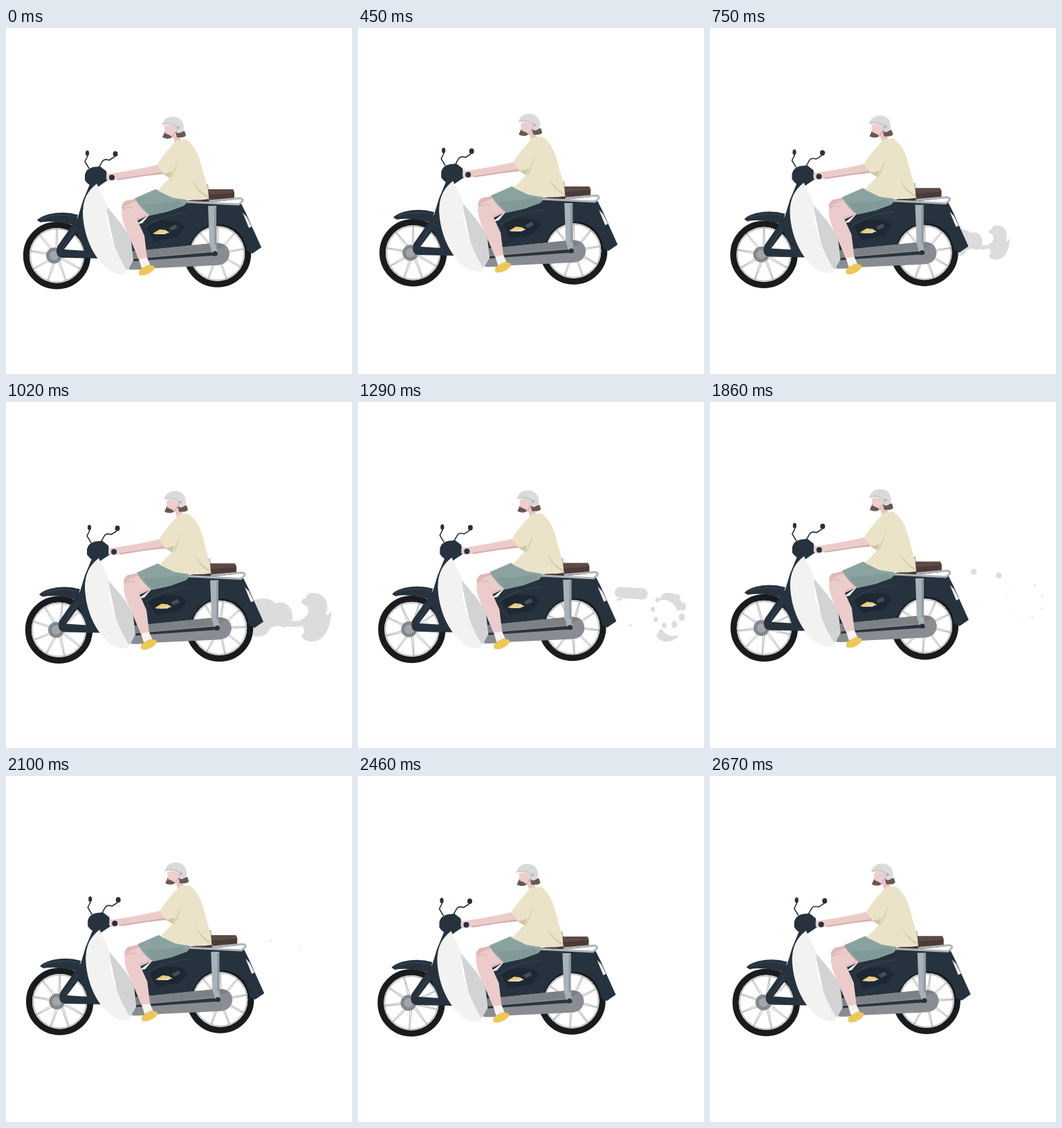
An HTML page for the animation above (2700 ms loop, 500 by 500 pixels).

```html
<!DOCTYPE html>
<html lang="en">
<head>
<meta charset="utf-8">
<title>Scooter ride</title>
<style>
html, body { margin: 0; width: 100%; height: 100%; overflow: hidden; background: #fff; }
svg { display: block; width: 100vw; height: 100vh; }
</style>
</head>
<body>
<svg viewBox="0 0 500 500">
  <defs>
    <filter id="rough" filterUnits="userSpaceOnUse" x="0" y="100" width="420" height="300" color-interpolation-filters="sRGB">
      <feTurbulence type="fractalNoise" baseFrequency="0.3" numOctaves="2" seed="4" result="n"/>
      <feDisplacementMap in="SourceGraphic" in2="n" scale="1.4" xChannelSelector="R" yChannelSelector="G"/>
    </filter>
  </defs>

  <g id="smoke" fill="#dcdcdc">
    <path id="cloud" d="M352 289C366 282 383 282 389 291C400 287 412 294 413 304C416 314 412 325 401 326C394 322 386 324 381 328C378 337 368 341 356 338Z
      M405 319C414 314 420 319 428 314C437 308 440 302 434 294C424 291 425 285 434 283C433 278 440 275 445 276C460 276 469 291 462 307C467 310 468 303 470 302C470 326 459 346 444 346C436 347 429 343 427 337C434 333 430 327 428 323C420 326 411 326 405 323Z"/>
    <g id="gaps" fill="#fff"></g>
    <g id="bits"></g>
  </g>

  <g id="ride" filter="url(#rough)">
    <g id="front"></g>
    <g id="rear"></g>

    <!-- mudguard, fork, rear body, handlebar, mirrors -->
    <g fill="#26323e">
      <path d="M45 278Q48 273 62 269Q84 264 104 270L99 286Q88 281 72 280Q57 279 50 281Z"/>
      <path fill-rule="evenodd" d="M121 226L111 250L104 273L74 316Q70 331 82 332L134 333L150 345L146 300L131 226ZM102 296L84 320L114 322Z"/>
      <path d="M178 275L208 268L250 252L340 254L347 268L355 286L369 317L356 326L348 322Q344 292 318 285Q286 280 271 303Q264 313 264 323L200 328L180 335Z"/>
      <path d="M114 212Q116 203 126 201L136 200L145 207L147 220L138 226L131 231Q120 229 114 220Z"/>
      <ellipse cx="117.500" cy="181" rx="2.600" ry="4"/>
      <ellipse cx="158" cy="182" rx="3.500" ry="4"/>
    </g>
    <path d="M118 185L114 193L120 203M157 186L149 191Q141 188 138 195L134 202" fill="none" stroke="#26323e" stroke-width="1.600"/>
    <path d="M50 276Q74 267 100 273M100 290L82 318M200 288Q225 270 262 267" fill="none" stroke="#374451" stroke-width="1.200"/>

    <!-- side panel and tail light -->
    <path d="M203 288Q222 273 252 281L258 288L247 302L214 308Z" fill="#1e2833"/>
    <path d="M235 289L245 284L248 289L239 293Z" fill="#424e59"/>
    <path d="M212 297L222 291L231 292L236 296L222 298Z" fill="#ebd06c"/>
    <path d="M212 298L236 294L230 298Z" fill="#e8d7df"/>
    <path d="M342 267L348 273L355 287L351 289Z" fill="#eeeeee"/>

    <!-- engine and swing arm -->
    <path d="M180 323L298 311Q322 308 323 327Q321 343 302 343L216 347Q192 350 178 349Q172 336 180 323Z" fill="#898d91"/>
    <path d="M180 323L298 311Q310 310 316 315L298 322L184 333Z" fill="#7c8186"/>
    <path d="M183 334L298 324Q306 323 306 327Q305 330 298 329L184 337Z" fill="#2b353f"/>

    <!-- leg shield -->
    <path d="M144 256C160 275 178 294 181 309L184 336L176 350L164 350Z" fill="#d2d3d4"/>
    <path d="M131 225C118 235 111 248 111 268C112 295 122 324 141 343C152 354 162 357 173 355L175 351C163 332 149 300 146 277C147 262 146 254 140 243Z" fill="#f2f2f0"/>

    <!-- saddle and rack -->
    <path d="M258 250L292 245L294 251L262 254Z" fill="#44393a"/>
    <path d="M288 227L292 225L294 246L290 247Z" fill="#bdb7a4"/>
    <path d="M291 233L328 233L330 237L330 248L294 252Z" fill="#4b3b38"/>
    <path d="M291 233L328 233L329 238L293 241Z" fill="#5d4944"/>
    <path d="M258 251L336 255Q347 248 338 246L294 250" fill="none" stroke="#b0b4b7" stroke-width="3"/>
    <path d="M292 257L304 257L304 313L305 324L298 325L294 312Z" fill="#a8b2b8"/>
    <path d="M301 259L304 259L304 313L301 314Z" fill="#8e999f"/>
    <circle cx="302" cy="326" r="3.500" fill="#26323e"/>

    <!-- legs -->
    <path d="M190 246L172 250Q165 256 168 263L190 268Z" fill="#dfb9b6"/>
    <path d="M188 284L209 268L197 282Z" fill="#f3f2ef"/>
    <path d="M190 250Q174 254 167 263Q166 277 176 297L192 335L204 333L200 300L190 278L210 269Z" fill="#ecccca"/>
    <path d="M184 261Q178 256 169 262M188 276Q198 274 206 267" fill="none" stroke="#d9aaa8" stroke-width="1"/>
    <path d="M192 334L204 332L209 344L196 347Z" fill="#f4f3ef"/>
    <path d="M192 351Q196 346 206 342L214 344Q217 348 208 354Q197 360 192 356Z" fill="#edc856"/>
    <path d="M216 233L260 246Q264 251 257 257L235 265L208 271Q195 262 186 246Z" fill="#8aa3a1"/>
    <path d="M196 254Q218 256 250 249L258 255L235 265L208 271Z" fill="#829a97"/>

    <!-- arm and shirt -->
    <path d="M222 197L226 209L200 213L160 219Q149 223 145 219L145 211L160 209Q198 203 222 197Z" fill="#ecccca"/>
    <path d="M226 208L200 212L160 218L162 220L200 214L227 211Z" fill="#d5afac"/>
    <circle cx="153" cy="216" r="4" fill="#26323e"/>
    <path d="M240 152L249 154L254 164L244 166Z" fill="#e8c3c0"/>
    <path d="M247 162L261 161Q274 171 280 190L292 234L293 247Q270 251 240 245L219 235L237 216Q226 211 218 198Q226 184 247 162Z" fill="#ebe3c7"/>
    <path d="M224 209Q231 212 240 207L237 217Z" fill="#cfc6a5"/>
    <path d="M240 211Q246 200 250 186Q247 203 238 220ZM269 219Q278 235 291 242L292 246Q276 238 269 219Z" fill="#d6cdae"/>

    <!-- head -->
    <path d="M230 149L226 158Q234 162 240 158L237 152Z" fill="#6b5751"/>
    <path d="M229 142Q236 138 245 144L247 153L242 159L237 155L230 152Z" fill="#eecdcb"/>
    <path d="M245 150L258 149L260 155Q258 159 247 158Z" fill="#6b5751"/>
    <path d="M225 141Q228 128 242 128Q256 129 257 144Q257 151 249 152Q244 151 244 144Q236 138 225 141Z" fill="#dadada"/>
    <path d="M227 139Q237 136 246 142L247 150" fill="none" stroke="#c2c2c2" stroke-width="1.200"/>
    <circle cx="249" cy="144" r="2" fill="#b3b3b3"/>
    <path d="M245 150L240 158" stroke="#a5a2a0"/>
  </g>
</svg>
<script>
const LOOP = 2700, STEP = 30;
const $ = id => document.getElementById(id);
const span = (t, a, b) => Math.max(0, Math.min(1, (t - a) / (b - a)));
const smooth = p => p * p * (3 - 2 * p);
const mix = (a, b, p) => a + (b - a) * p;
const show = (el, on) => { el.style.display = on ? '' : 'none'; };

let seed = 7;
const rand = () => (seed = seed * 16807 % 2147483647) / 2147483647;

function set(el, attrs) {
  for (const k in attrs) el.setAttribute(k, attrs[k]);
  return el;
}
function add(parent, tag, attrs = {}) {
  const el = document.createElementNS('http://www.w3.org/2000/svg', tag);
  parent.appendChild(el);
  return set(el, attrs);
}

function wheel(id, cx, cy) {
  const g = $(id);
  add(g, 'circle', { cx, cy, r: 44.2, fill: '#fff', stroke: '#1a1b1c', 'stroke-width': 9 });
  add(g, 'circle', { cx, cy, r: 38.6, fill: 'none', stroke: '#c4c6c7', 'stroke-width': 2.2 });
  const spokes = add(g, 'g', { stroke: '#a9abad', 'stroke-width': 0.9 });
  for (let i = 0; i < 18; i++) {
    const a = i * Math.PI / 9, b = a + (i % 2 ? 0.16 : -0.16);
    add(spokes, 'line', {
      x1: cx + 8 * Math.cos(a), y1: cy + 8 * Math.sin(a),
      x2: cx + 39 * Math.cos(b), y2: cy + 39 * Math.sin(b)
    });
  }
  add(g, 'circle', { cx: cx - 4, cy, r: 11.5, fill: '#84898d' });
  add(g, 'circle', { cx: cx - 4, cy, r: 6.5, fill: '#a2a6a9' });
  return angle => set(spokes, { transform: `rotate(${angle} ${cx} ${cy})` });
}
const wheels = [wheel('front', 73.5, 328.8), wheel('rear', 305.5, 326)];

// key points of the shake: time, x, y
const keys = [
  [0, 0, 0], [450, 6.2, -4], [1020, 3, 0.5], [1560, 5.7, -1.2],
  [2100, 4.2, -3], [2460, 3.5, -1], [2670, 7.7, -1.6]
];
function shake(t) {
  const i = Math.max(1, keys.findIndex(k => k[0] >= t));
  const [t0, x0, y0] = keys[i - 1], [t1, x1, y1] = keys[i];
  const p = smooth(span(t, t0, t1));
  return [mix(x0, x1, p), mix(y0, y1, p)];
}

// holes that grow until they have eaten the cloud
const gaps = Array.from({ length: 9 }, (_, i) =>
  add($('gaps'), 'circle', { cx: 358 + 14 * i, cy: 295 + 32 * rand() }));

// scraps left along a ring, smaller towards its far end
const bits = Array.from({ length: 8 }, (_, i) => {
  const a = (i * 40 - 55) * Math.PI / 180;
  return { dx: Math.cos(a), dy: Math.sin(a), r: mix(4.5, 2, i / 7) + rand(), el: add($('bits'), 'ellipse') };
});

// a long wisp that rises, thins and ends as two specks
const wisp = add($('bits'), 'line', { stroke: '#dcdcdc' });
const ends = [add($('bits'), 'circle'), add($('bits'), 'circle')];

function drawSmoke(t) {
  show($('smoke'), t >= 570 && t < 2160);
  const grow = 1 - (1 - span(t, 540, 1000)) ** 2;
  const eat = smooth(span(t, 1060, 1500));
  show($('cloud'), eat < 1);
  show($('gaps'), eat < 1);
  set($('cloud'), { transform: `translate(${345 + 8 * span(t, 1020, 1560)} 308) scale(${grow}) translate(-345 -308)` });
  for (const g of gaps) set(g, { r: 36 * eat });

  show($('bits'), t > 1060);
  const born = smooth(span(t, 1060, 1250)), go = smooth(span(t, 1060, 1560));
  const fade = span(t, 1560, 1950);
  for (const { dx, dy, r, el } of bits) {
    const ring = mix(18, 27, go), k = r * born * (1 - fade);
    set(el, { cx: 448 + ring * dx + 8 * fade, cy: mix(306, 296, go) + ring * dy - 12 * fade, rx: k, ry: k * 1.2 });
  }

  const thin = span(t, 1560, 2130);
  const y = mix(292, 254, go);
  const x1 = mix(379, 383, thin), y1 = y - 17 * thin;
  const x2 = mix(410, 424, thin), y2 = y + 2 - 10 * thin;
  set(wisp, { x1, y1, x2, y2, 'stroke-width': 16 * born * Math.max(0, 1 - 2 * thin) });
  set(ends[0], { cx: x1, cy: y1, r: 8 * born * mix(1, 0.08, thin) });
  set(ends[1], { cx: x2, cy: y2, r: 8.5 * born * mix(1, 0.08, thin) });
}

function draw(t) {
  const [x, y] = shake(t);
  set($('ride'), { transform: `translate(${x.toFixed(2)} ${y.toFixed(2)})` });
  for (const turn of wheels) turn(-720 * t / LOOP);
  drawSmoke(t);
}

const start = performance.now();
function tick(now) {
  const t = Math.max(0, now - start) % LOOP;
  draw(Math.floor(t / STEP) * STEP);
  requestAnimationFrame(tick);
}
draw(0);
requestAnimationFrame(tick);
</script>
</body>
</html>
```
